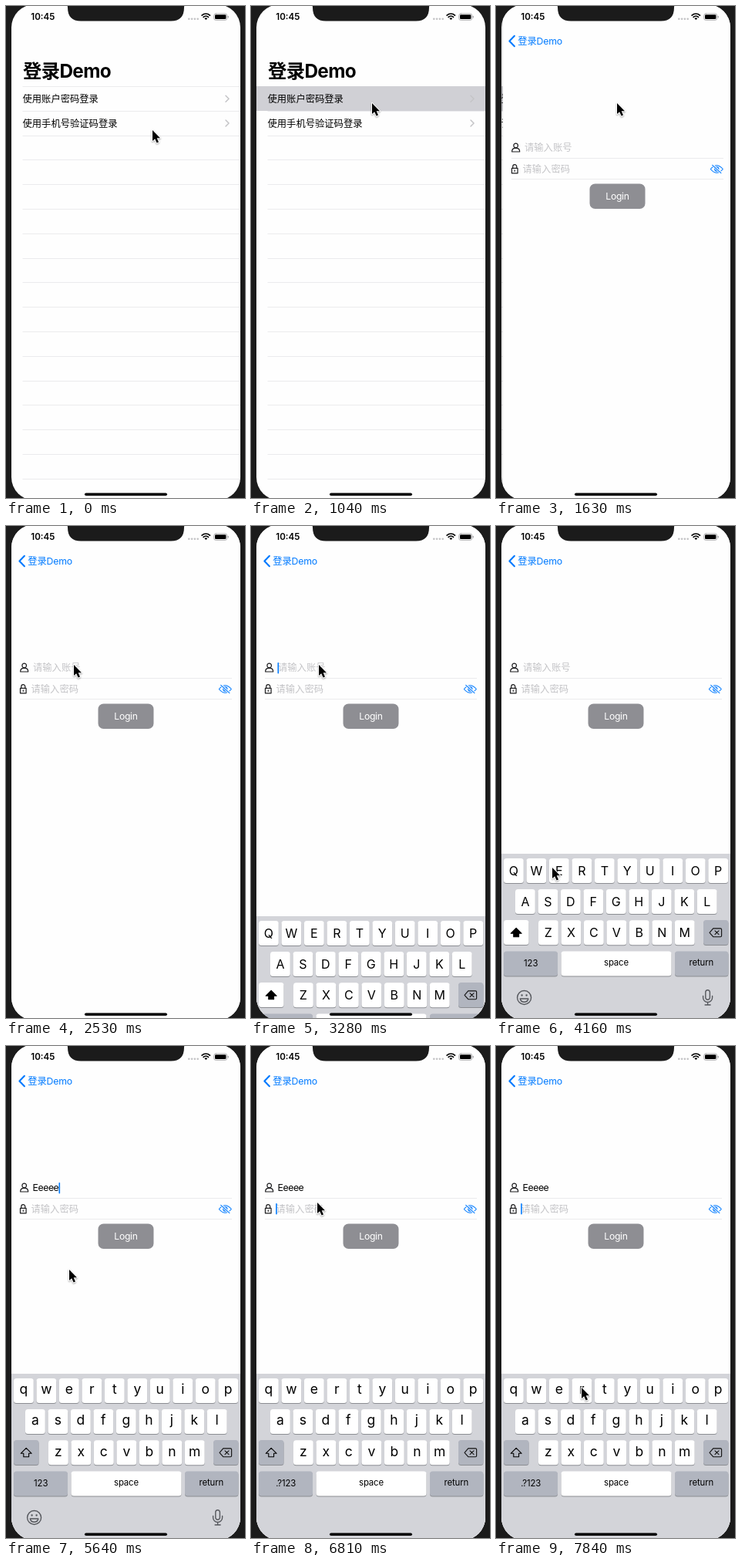
These frames come from a looping animation (310x638 px, 7.99 s). An HTML page with a canvas:

```html
<!DOCTYPE html>
<html lang="zh-CN">
<head>
<meta charset="utf-8">
<title>Login demo</title>
<style>
html, body { margin: 0; width: 100%; height: 100%; overflow: hidden; background: #1b1b1b; }
canvas { display: block; }
</style>
</head>
<body>
<canvas id="stage" width="310" height="638"></canvas>
<script>
const LOOP = 7990, STEP = 147.5;
const BLUE = '#007aff', GREY = '#c4c4c7', RULE = '#ebebed', INK = '#1c1c1e';
const LEFT = 7, WIDTH = 297;
const ctx = document.getElementById('stage').getContext('2d');

// Drawing helpers
function box(x, y, w, h, r, color) {
  ctx.fillStyle = color;
  ctx.beginPath();
  ctx.roundRect(x, y, w, h, r);
  ctx.fill();
}

function text(str, x, y, size, color, { weight = 400, align = 'left', spacing = 0 } = {}) {
  ctx.font = `${weight} ${size}px Inter, "Noto Sans CJK SC", "Noto Sans CJK", sans-serif`;
  ctx.letterSpacing = spacing + 'px';
  ctx.textAlign = align;
  ctx.fillStyle = color;
  ctx.fillText(str, x, y);
}

function shape(d, x, y, { fill, stroke, width = 1 }) {
  const path = new Path2D(d);
  ctx.save();
  ctx.translate(x, y);
  ctx.lineCap = ctx.lineJoin = 'round';
  ctx.lineWidth = width;
  if (fill) { ctx.fillStyle = fill; ctx.fill(path); }
  if (stroke) { ctx.strokeStyle = stroke; ctx.stroke(path); }
  ctx.restore();
}

const disc = (r, x = 0, y = 0) => `M${x - r} ${y}a${r} ${r} 0 1 1 ${2 * r} 0a${r} ${r} 0 1 1 ${-2 * r} 0z`;

// Timing helpers: motion advances in held steps
const ticks = (t, start) => Math.floor((t - start + 5) / STEP);
const glide = (t, start, n) => Math.min(1, Math.max(0, (ticks(t, start) + 1) / n));
const settle = (t, start, from) => Math.round(from * 0.105 ** ticks(t, start));
const blink = (t, start) => (t - start) % 1000 < 600;

// Pointer moves: start time, steps, destination
const MOVES = [
  [150, 3, 157, 126],
  [2080, 4, 88, 180],
  [3430, 5, 73, 443],
  [5490, 2, 82, 290],
  [5780, 2, 86, 203],
  [6820, 6, 134, 457],
  [7690, 2, 111, 443]
];

function pointer(t) {
  let x = 190, y = 161;
  for (const [start, n, toX, toY] of MOVES) {
    const p = glide(t, start, n);
    x += (toX - x) * p;
    y += (toY - y) * p;
  }
  ctx.save();
  ctx.shadowColor = 'rgba(0,0,0,.35)';
  ctx.shadowBlur = 2;
  ctx.shadowOffsetY = 1;
  const arrow = 'M0 0V14L3.2 11.2L5.6 16.6L8 15.5L5.7 10.3H10z';
  shape(arrow, x, y, { stroke: '#fff', width: 2 });
  ctx.restore();
  shape(arrow, x, y, { fill: '#000' });
}

function menu(t) {
  for (let i = 0; i < 17; i++) box(21.5, Math.round(104 + 31.8 * i), 283, 1, 0, RULE);
  if (t >= 1040) box(LEFT, 104, WIDTH, 32, 0, '#d0d0d5');
  ['使用账户密码登录', '使用手机号验证码登录'].forEach((label, i) => {
    const y = 120.2 + 31.8 * i;
    text(label, 21.5, y + 4.7, 12.3, '#000');
    shape('M-2 -4L2 0L-2 4', 287, y, { stroke: GREY, width: 1.5 });
  });
}

function caret(x, y) {
  box(x, y, 1.6, 14.5, 0.8, BLUE);
}

function form(t) {
  const typed = [4450, 4600, 4890, 5040, 5340].filter(at => t >= at).length;

  shape(disc(2.8, 0, -3) + 'M-5 5Q-5 .8 -1.6 .4H1.6Q5 .8 5 5z', 23.7, 184, { stroke: INK, width: 1.2 });
  if (typed) text('E' + 'e'.repeat(typed - 1), 34.5, 188, 12.3, '#000', { spacing: -0.45 });
  else text('请输入账号', 35, 188, 12.3, GREY);
  box(18, 197, 275, 1, 0, RULE);

  shape('M-3.8 -1.2H3.8V5.2H-3.8zM-2.5 -1.2V-3.4a2.5 2.5 0 0 1 5 0V-1.2M0 1.3V2.7', 22.3, 211.6, { stroke: INK, width: 1.2 });
  text('请输入密码', 32.5, 215.5, 12.3, GREY);
  box(18, 224, 275, 1, 0, RULE);
  shape('M-8 0Q0 -9.5 8 0Q0 9.5 -8 0z' + disc(2.6), 284.3, 211.5, { stroke: BLUE, width: 1.1 });
  shape(disc(1.6), 284.3, 211.5, { fill: BLUE });
  shape('M-5.2 -5L5.6 5', 284.3, 211.5, { stroke: '#fff', width: 2.6 });
  shape('M-5.6 -5.2L5.6 5.2', 284.3, 211.5, { stroke: BLUE, width: 1.1 });

  box(119.5, 230.5, 72, 32.5, 7, '#8e8e93');
  text('Login', 155.5, 251, 12.2, '#fff', { align: 'center', spacing: -0.3 });

  const edge = typed ? 34.7 + 7 + (typed - 1) * 6.7 : 34.5;
  if (t >= 6520) blink(t, 6520) && caret(32.2, 204);
  else if (t >= 5340) blink(t, 5340) && caret(edge, 177);
  else if (t >= 4310 || t >= 3280 && blink(t, 3280)) caret(edge, 177);
}

function key(x, y, w, color = '#fff') {
  box(x, y + 1, w, 32, 3.5, '#8b8d92');
  box(x, y, w, 32, 3.5, color);
}

function keyboard(t) {
  const top = 425, dark = '#b1b5bf', upper = t < 4450, secret = t >= 6520;
  const center = { align: 'center' };
  const glyph = (c, x, y) => upper
    ? text(c.toUpperCase(), x, y + 21.8, 16, '#000', center)
    : text(c, x, y + 20.3, 17.5, '#000', center);
  const pressed = [[4310, 4450], [4600, 4890], [5040, 5340]].some(([a, b]) => t >= a && t < b);

  ctx.save();
  ctx.translate(0, settle(t, 3280, 81));
  box(LEFT, top, WIDTH, 240, 0, '#d3d4d9');

  [['qwertyuiop', 10], ['asdfghjkl', 25], ['zxcvbnm', 55]].forEach(([row, x0], r) => {
    const y = top + 6 + 40.1 * r;
    [...row].forEach((c, i) => {
      const x = x0 + 29.48 * i;
      key(x, y, 25.8);
      if (!(pressed && c === 'e')) glyph(c, x + 12.9, y);
    });
  });

  key(10, top + 86, 32.5, upper ? '#fff' : dark);
  shape('M0 -6L7 1H3.4V5.5H-3.4V1H-7z', 26.2, top + 102.3, { stroke: '#000', fill: upper && '#000', width: 1.1 });
  key(269, top + 86, 32.3, dark);
  shape('M-8 0L-3.3 -5.4H6.2Q7.6 -5.4 7.6 -4V4Q7.6 5.4 6.2 5.4H-3.3zM-1 -2.4L4 2.4M4 -2.4L-1 2.4', 285, top + 102.3, { stroke: '#111', width: 1.1 });

  key(10, top + 126.4, 70, dark);
  key(84.5, top + 126.4, 143, '#fff');
  key(232, top + 126.4, 69.3, dark);
  [[secret ? '.?123' : '123', 45.2, 146.3], ['space', 156, 145.3], ['return', 266.3, 145.3]].forEach(([label, x, y]) =>
    text(label, x, top + y, 11.4, '#000', { align: 'center', spacing: -0.15 }));

  if (!secret) {
    const pen = { stroke: '#56585d', width: 1.4 };
    shape(disc(9) + 'M-5.3 1.5H5.3Q4.4 5.8 0 5.8T-5.3 1.5', 36.6, top + 186.5, pen);
    shape(disc(1.2, -3, -3) + disc(1.2, 3, -3), 36.6, top + 186.5, { fill: '#56585d' });
    shape('M-2.8 -7a2.8 2.8 0 0 1 5.6 0V0a2.8 2.8 0 0 1 -5.6 0zM-6 -2V0a6 6 0 0 0 12 0V-2M0 6V9.5M-3.5 9.5H3.5', 274.6, top + 186.5, pen);
  }

  if (pressed) {
    ctx.save();
    ctx.shadowColor = 'rgba(0,0,0,.3)';
    ctx.shadowBlur = 2;
    shape('M-17 -46H17Q22 -46 22 -41V-14C22 -7 12.9 -5 12.9 3V29Q12.9 32 9.4 32H-9.4Q-12.9 32 -12.9 29V3C-12.9 -5 -22 -7 -22 -14V-41Q-22 -46 -17 -46z', 82, top + 6, { fill: '#fff' });
    ctx.restore();
    text(upper ? 'E' : 'e', 82, top - 8, 27, '#000', center);
  }
  ctx.restore();
}

function statusBar() {
  text('10:45', 32.3, 18.2, 11.6, '#000', { weight: 600 });
  for (let i = 0; i < 4; i++) shape(disc(1.3), 237.3 + 3.8 * i, 16.7, { fill: '#c2c2c4' });
  shape('M-5.2 -5.2A7.4 7.4 0 0 1 5.2 -5.2M-3.2 -2.9A4.6 4.6 0 0 1 3.2 -2.9', 259.3, 17.3, { stroke: '#000', width: 1.6 });
  shape('M0 .8L-2 -1.3Q0 -2.9 2 -1.3z', 259.3, 17.3, { fill: '#000' });
  shape('M2.5 0H14.5Q17 0 17 2.5V6Q17 8.5 14.5 8.5H2.5Q0 8.5 0 6V2.5Q0 0 2.5 0z', 269.7, 9.9, { stroke: '#a8a8aa', width: 0.9 });
  box(271, 11.2, 14.4, 5.9, 1.3, '#000');
  box(287.6, 12.7, 1.2, 3, 0.6, '#a8a8aa');
}

function draw(t) {
  const pushing = t >= 1340;
  const offset = pushing ? settle(t, 1340, 180) : WIDTH;
  const p = 1 - offset / WIDTH;

  ctx.fillStyle = '#1b1b1b';
  ctx.fillRect(0, 0, 310, 638);
  ctx.save();
  ctx.beginPath();
  ctx.roundRect(LEFT, -2, WIDTH, 643, 30);
  ctx.clip();
  ctx.fillStyle = '#fefefe';
  ctx.fillRect(0, 0, 310, 638);

  if (offset) {
    ctx.save();
    ctx.translate(-0.3 * WIDTH * p, 0);
    menu(t);
    ctx.restore();
    box(LEFT, 0, WIDTH, 638, 0, `rgba(0,0,0,${0.1 * p})`);
  }
  if (pushing) {
    ctx.save();
    ctx.translate(offset, 0);
    box(LEFT, 0, WIDTH, 638, 0, '#fefefe');
    form(t);
    ctx.restore();
  }

  // The large title gives way to the back button
  ctx.globalAlpha = 1 - p;
  if (offset > 9) text('登录Demo', 22 - offset * 0 - 60 * p, 93, 24.3, '#000', { weight: 700, spacing: -0.6 });
  ctx.globalAlpha = p;
  const back = offset > 9 ? offset * 0.3 : 0;
  shape('M3.2 -6.7L-3.3 0L3.2 6.7', 20.7 + back, 45.5, { stroke: BLUE, width: 2.1 });
  text('登录Demo', 28.3 + back, 49.8, 12.3, BLUE, { spacing: -0.2 });
  ctx.globalAlpha = 1;

  if (t >= 3280) keyboard(t);
  statusBar();
  box(102, 631.5, 107, 3.6, 1.8, '#000');
  shape('M78 -1Q80 -1 80 2Q80 19.5 97 19.5H214Q231 19.5 231 2Q231 -1 233 -1z', 0, 0, { fill: '#1b1b1b' });
  ctx.restore();
  pointer(t);
}

const begin = performance.now();
function frame() {
  draw((performance.now() - begin) % LOOP);
  requestAnimationFrame(frame);
}
frame();
</script>
</body>
</html>
```
